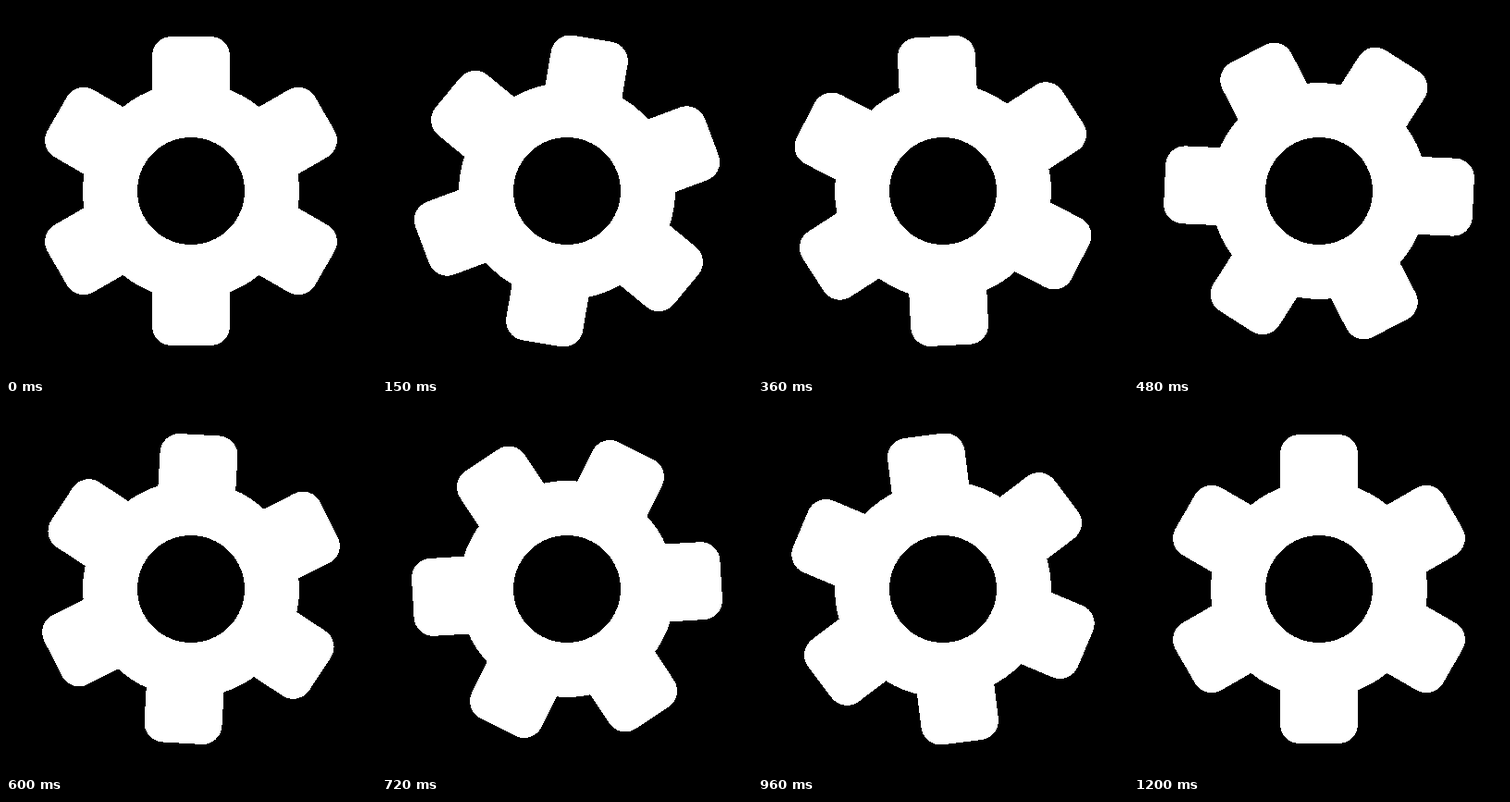
These frames come from a looping animation (400x400 px, 3.23 s). An HTML page:

```html
<!DOCTYPE html>
<html lang="en">
<head>
<meta charset="utf-8">
<title>Turning gear</title>
<style>
  html, body { margin: 0; width: 100%; height: 100%; overflow: hidden; background: #000; }
  svg { display: block; width: 100vw; height: 100vh; }
</style>
</head>
<body>
<svg viewBox="-200 -200 400 400" shape-rendering="crispEdges">
  <defs>
    <rect id="bar" x="-42" y="-167" width="84" height="334" rx="21"/>
  </defs>
  <g id="gear" fill="#fff">
    <use href="#bar"/>
    <use href="#bar" transform="rotate(60)"/>
    <use href="#bar" transform="rotate(120)"/>
    <circle r="117"/>
  </g>
  <circle r="58"/>
</svg>
<script>
  const LOOP = 3230, TURN = 1200, STEP = 30, ANGLE = 180;
  const gear = document.getElementById('gear');

  // Cubic Bezier easing with control points (x1, 0) and (x2, 1)
  function ease(t, x1 = 0.333, x2 = 0.38) {
    let lo = 0, hi = 1;
    for (let i = 0; i < 30; i++) {
      const s = (lo + hi) / 2, r = 1 - s;
      const x = 3 * x1 * s * r * r + 3 * x2 * s * s * r + s * s * s;
      if (x < t) lo = s; else hi = s;
    }
    return lo * lo * (3 - 2 * lo);
  }

  function draw() {
    const time = Math.min(performance.now() % LOOP, TURN);
    const held = Math.floor(time / STEP) * STEP;
    const angle = ANGLE * ease(held / TURN);
    gear.setAttribute('transform', `rotate(${angle.toFixed(3)})`);
    requestAnimationFrame(draw);
  }
  draw();
</script>
</body>
</html>
```
